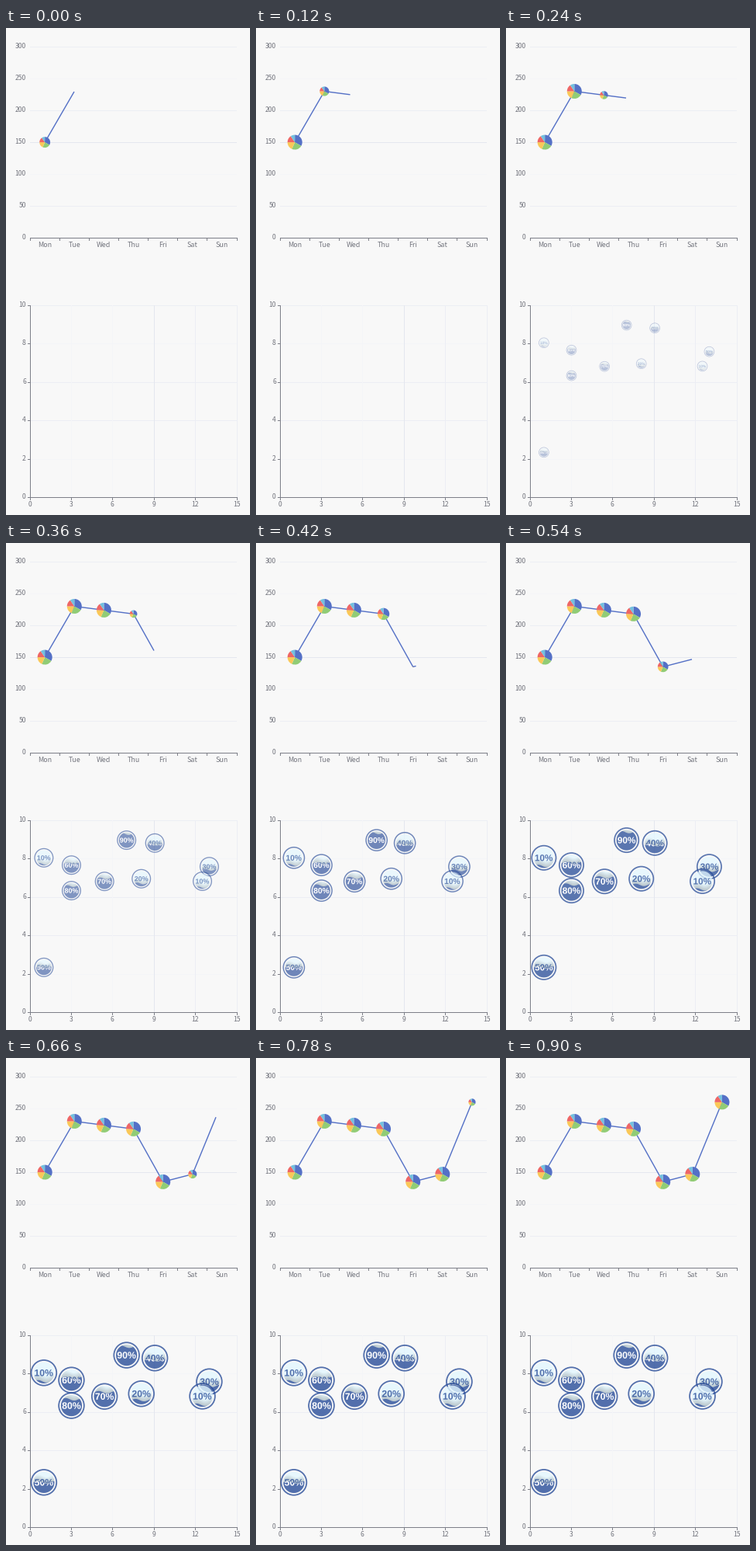
A matplotlib script that plays this animation: 315x627 px, repeating every 1.86 s.

```python
import numpy as np
import matplotlib.pyplot as plt
from matplotlib.animation import FuncAnimation
from matplotlib.patches import Circle, PathPatch, Polygon, Wedge
from matplotlib.textpath import TextPath
from matplotlib.transforms import Affine2D

W, H, DPI = 315, 627, 64
PT = 72 / DPI  # points per pixel
FRAMES, STEP = 31, 60
LEFT, WIDTH = 31.1, 266.9
RIGHT = LEFT + WIDTH

BACK, AXIS, TEXT = "#f8f8f8", "#7d7f88", "#73757e"
STRONG, GRID, FAINT = "#e4e7ef", "#eceef4", "#f4f5f8"
LINE, NAVY, ICE = "#5470c6", "#294d99", "#e3f7ff"
SLICES = [(1048, "#5470c6"), (735, "#91cc75"), (580, "#fac858"),
          (484, "#ee6666"), (300, "#73c0de")]

DAYS = ["Mon", "Tue", "Wed", "Thu", "Fri", "Sat", "Sun"]
DAY_X = LEFT + WIDTH / 7 * (np.arange(7) + 0.5)
DAY_Y = 270.1 - 0.82 * np.array([150, 230, 224, 218, 135, 147, 260])
BALLS = [(1, 8.04, 10), (8.07, 6.95, 20), (13, 7.58, 30), (9.05, 8.81, 40),
         (1, 2.33, 50), (3, 7.66, 60), (5.4, 6.81, 70), (3, 6.33, 80),
         (7, 8.96, 90), (12.5, 6.82, 10)]

PIE_R, RING_R, RING_W, TANK_R = 9.5, 16.4, 1.8, 13.7

fig = plt.figure(figsize=(W / DPI, H / DPI), dpi=DPI, facecolor=BACK)
ax = fig.add_axes([0, 0, 1, 1])
ax.set(xlim=(0, W), ylim=(H, 0))
ax.axis("off")


def stroke(x0, y0, x1, y1, color):
    ax.plot([x0, x1], [y0, y1], color=color, lw=PT, zorder=1,
            solid_capstyle="butt", snap=False)


def label(x, y, text, ha="center", size=8.5):
    ax.text(x, y + 3.1, text, ha=ha, va="baseline", color=TEXT,
            fontsize=size * PT, family="Noto Sans CJK JP")


def draw_axes():
    for v in range(0, 301, 50):
        y = round(270 - 0.82 * v) + 0.5
        if v:
            color = {150: STRONG, 100: FAINT, 250: FAINT}.get(v, GRID)
            stroke(31, y, RIGHT, y, color)
        label(25.8, y - 1.4, str(v), "right")
    for i in range(8):
        x = int(LEFT + WIDTH / 7 * i) + 0.5
        stroke(x, 270, x, 274, AXIS)
    for x, day in zip(DAY_X, DAYS):
        label(x, 279, day, size=8.9)
    stroke(31, 270.5, RIGHT, 270.5, AXIS)

    for v in range(0, 11, 2):
        y = round(604 - 24.7 * v) + 0.5
        if v:
            stroke(31, y, RIGHT, y, FAINT if v in (2, 8) else GRID)
        stroke(28, y, 31, y, AXIS)
        label(25.8, y - 1.4, str(v), "right")
    for v in range(0, 16, 3):
        x = int(LEFT + WIDTH / 15 * v) + 0.5
        if v:
            color = {9: STRONG, 3: FAINT, 6: FAINT}.get(v, GRID)
            stroke(x, 357, x, 604, color)
        stroke(x, 604, x, 608, AXIS)
        label(x - 0.3, 613, str(v))
    stroke(31.5, 357, 31.5, 605, AXIS)
    stroke(31, 604.5, RIGHT, 604.5, AXIS)


def centered_text(text):
    path = TextPath((0, 0), text, size=12.3,
                    prop=dict(family="Liberation Sans", weight="bold"))
    box = path.get_extents()
    move = Affine2D().translate(-(box.x0 + box.x1) / 2, -(box.y0 + box.y1) / 2)
    return path.transformed(move.scale(1, -1))


TEXTS = {p: centered_text(f"{p}%") for p in range(10, 100, 10)}
live = []


def add(patch, z, clip=None):
    patch.set_zorder(z)
    ax.add_patch(patch)
    if clip is not None:
        patch.set_clip_path(clip)
    live.append(patch)
    return patch


def draw_pie(x, y, r):
    total = sum(v for v, _ in SLICES)
    start = -90.0
    for value, color in SLICES:
        end = start + 360 * value / total
        add(Wedge((x, y), r, start, end, fc=color, ec="none"), 40)
        start = end


def draw_ball(x, y, percent, s, z):
    alpha = 0.8 * s
    u = np.linspace(-TANK_R, TANK_R, 81)
    arc = np.sqrt(np.maximum(TANK_R**2 - u**2, 0))
    wave = TANK_R * (1 - percent / 50) + 1.6 * np.sin(2 * np.pi * (u + 2) / 22)
    surface = np.clip(wave, -arc, arc)

    def band(top, bottom, color, opacity):
        pts = np.r_[np.c_[u, top], np.c_[u, bottom][::-1]]
        return add(Polygon(pts * s + (x, y), fc=color, ec="none",
                           alpha=opacity), z)

    air = band(-arc, surface, ICE, alpha)
    for lift in np.arange(1, 9, 1.2):  # soft shadow above the water
        band(np.clip(wave - lift, -arc, arc), surface, "black", 0.035 * alpha)
    water = band(surface, arc, NAVY, alpha)
    add(Circle((x, y), RING_R * s, fill=False, ec=NAVY, alpha=alpha,
               lw=RING_W * s * PT), z)

    glyphs = TEXTS[percent].transformed(Affine2D().scale(s).translate(x, y))
    add(PathPatch(glyphs, fc=NAVY, ec="none", alpha=alpha), z + 0.5, air)
    add(PathPatch(glyphs, fc="white", ec="none"), z + 0.5, water)


def update(k):
    for artist in live:
        artist.remove()
    live.clear()

    # The line is revealed left to right; each pie grows once it is passed.
    reveal = np.interp(k, [0, 4, 6, 8, 9, 11, 15], [88, 155, 191, 222, 240, 271, 337])
    tip = min(reveal, DAY_X[-1])
    seen = DAY_X < tip
    xs = np.r_[DAY_X[seen], tip]
    ys = np.r_[DAY_Y[seen], np.interp(tip, DAY_X, DAY_Y)]
    live.extend(ax.plot(xs, ys, color=LINE, lw=1.4 * PT, zorder=30, snap=False,
                        solid_capstyle="butt", solid_joinstyle="bevel"))
    for x, y in zip(DAY_X, DAY_Y):
        r = min(PIE_R, 0.183 * (reveal - x))
        if r > 0:
            draw_pie(x, y, r)

    t = np.clip((k - 2.44) / 10.25, 0, 1)
    s = 1 - (1 - t) ** 3
    if s > 0:
        for i, (vx, vy, percent) in enumerate(BALLS):
            draw_ball(LEFT + WIDTH / 15 * vx, 603.9 - 24.7 * vy, percent, s, 10 + i)
    return live


draw_axes()
anim = FuncAnimation(fig, update, frames=FRAMES, interval=STEP,
                     init_func=lambda: update(0), repeat=True, repeat_delay=0)
plt.show()
```
